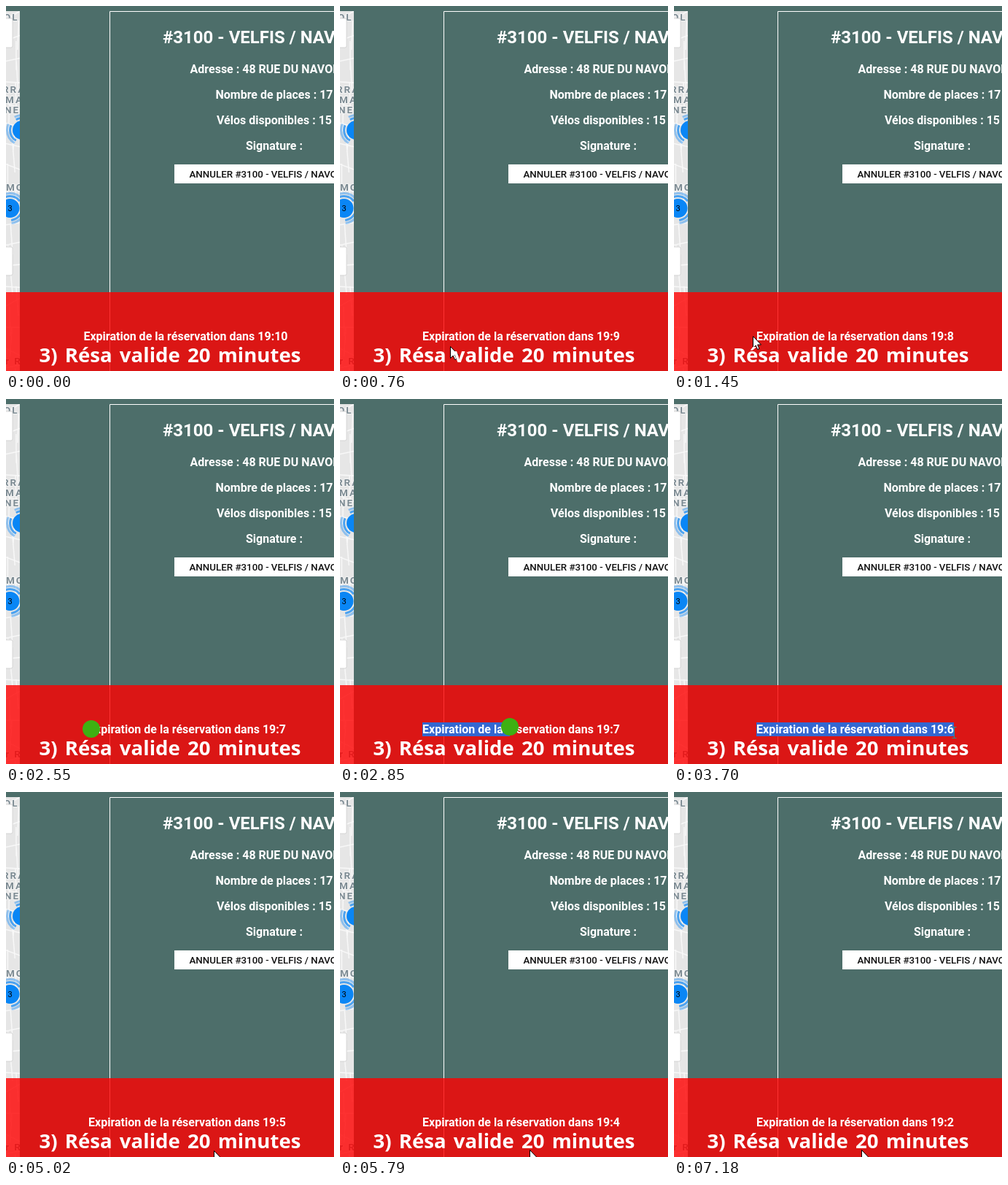
Write an HTML page that moves like this. It is 450 px wide and 500 px high and loops after 8 s.

```html
<!DOCTYPE html>
<html lang="fr">
<head>
<meta charset="utf-8">
<title>Réservation</title>
<style>
html, body { margin: 0; width: 100%; height: 100%; overflow: hidden; background: #4d6e6a; }
svg { display: block; width: 450px; height: 500px; }
text { font-family: Roboto, sans-serif; white-space: pre; }
.info { font-size: 16px; font-weight: 700; fill: #fff; }
.title { font-size: 24px; font-weight: 700; fill: #fff; }
.button { font-size: 13.333px; font-weight: 500; fill: #111; }
.caption { font: 700 27.6px "Open Sans", "Noto Sans", sans-serif; word-spacing: 3px; fill: #fff; }
.place { font-size: 13.5px; font-weight: 700; letter-spacing: 2px; fill: #7d8b93; stroke: #f4f4f4; stroke-width: 2px; paint-order: stroke; }
.middle { text-anchor: middle; }
.ring { fill: none; stroke: #0a86f5; stroke-width: 3; }
.panel { fill: #fff; stroke: #d4d4d4; }
</style>
</head>
<body>
<svg viewBox="0 0 450 500">
  <defs>
    <clipPath id="strip"><rect y="7" width="19" height="493"/></clipPath>
    <g id="cluster">
      <circle class="ring" r="20.500" pathLength="3" stroke-dasharray=".7 .3" stroke-opacity=".4"/>
      <circle class="ring" r="16.500" pathLength="3" stroke-dasharray=".7 .3" stroke-opacity=".7"/>
      <circle r="13" fill="#0a86f5"/>
    </g>
  </defs>

  <rect width="450" height="500" fill="#4d6e6a"/>

  <g clip-path="url(#strip)">
    <rect width="19" height="500" fill="#e6e6e6"/>
    <path id="roads" fill="none" stroke="#f8f8f8" stroke-width="1.500"/>
    <text class="place" x="-3" y="20">OL</text>
    <rect class="panel" x="-5" y="17" width="14" height="40" rx="2"/>
    <rect class="panel" x="-5" y="330" width="14" height="39" rx="2"/>
    <text class="place" x="-5" y="119">RRA</text>
    <text class="place" x="-1" y="133">MA</text>
    <text class="place" x="-2" y="147">NE</text>
    <text class="place" x="0" y="253">MO</text>
    <text class="place" x="-1" y="491">r R</text>
    <use href="#cluster" x="22" y="170"/>
    <use href="#cluster" x="5.500" y="277"/>
    <text class="middle" x="5.500" y="281" font-size="11">3</text>
  </g>

  <path d="M450 7.500H142.500V500" fill="none" stroke="#fff"/>
  <text class="title" x="215" y="51">#3100 - VELFIS / NAVORINE</text>
  <text class="info" x="252.500" y="92">Adresse : 48 RUE DU NAVORINE</text>
  <text class="info middle" x="368" y="127">Nombre de places : 17</text>
  <text class="info middle" x="368" y="162">Vélos disponibles : 15</text>
  <text class="info middle" x="368" y="197">Signature :</text>
  <rect x="231" y="217" width="274" height="26" fill="#fff"/>
  <text class="button" x="251.500" y="235">ANNULER #3100 - VELFIS / NAVORINE</text>

  <rect y="392" width="450" height="108" fill="#f00" fill-opacity=".8"/>
  <rect id="selection" x="113" y="443" width="0" height="19" fill="#3367d1"/>
  <text id="expiry" class="info" y="458"></text>

  <path id="arrow" d="M.5 .5V16.500L4.200 13L6.700 18.500L9 17.500L6.600 12H11.500Z" fill="#fff" stroke="#000"/>
  <path id="beam" d="M-3 -7.500H3M0 -7.500V7.500M-3 7.500H3" fill="none" stroke="#2a8f96"/>
  <circle id="press" r="12" fill="#3eb012"/>

  <text class="caption middle" x="225" y="488">3) Résa valide 20 minutes</text>
</svg>
<script>
const LOOP = 8000, STEP = 77;
const PRESS = 2550, RELEASE = 3620, CLEAR = 3850;
const TEXT_LEFT = 113, TEXT_RIGHT = 384;

// Moments when the countdown loses a second
const ticks = [300, 1217, 2230, 3243, 4270, 5560, 6720, 7180];

const moves = [
  { at: 300, steps: 10, from: [215, 479], to: [108, 458] },
  { at: 1140, steps: 9, from: [96, 456], to: [123, 447] },
  { at: PRESS, steps: 4, from: [117, 452], to: [233, 449] },
  { at: 2858, steps: 6, from: [233, 449], to: [382, 452] },
  { at: 3697, steps: 2, from: [384, 456], to: [372, 510] },
  { at: 4710, steps: 10, from: [297, 493], to: [268, 489] },
  { at: 5560, steps: 4, from: [268, 489], to: [257, 490] }
];

const el = id => document.getElementById(id);
const arrow = el("arrow"), beam = el("beam"), press = el("press");
const selection = el("selection"), expiry = el("expiry");

function drawRoads() {
  let seed = 7, d = "";
  const random = () => (seed = seed * 16807 % 2147483647) / 2147483647;
  for (let y = 20; y < 500; y += 28) {
    d += `M-2 ${y}L22 ${y + 30 * random() - 15}`;
    d += `M${19 * random()} ${y}l${8 * random() - 4} 40`;
  }
  el("roads").setAttribute("d", d);
}

function pointer(t) {
  const move = moves.findLast(m => m.at <= t);
  if (!move) return null;
  const step = Math.floor((t - move.at + 8) / STEP);
  const k = Math.min(1, step / move.steps);
  return move.from.map((v, i) => Math.round(v + (move.to[i] - v) * k));
}

function place(node, [x, y], visible) {
  node.setAttribute("transform", `translate(${x} ${y})`);
  node.style.display = visible ? "" : "none";
}

function draw(t) {
  const left = 10 - ticks.filter(v => v <= t).length;
  expiry.textContent = "Expiration de la réservation dans 19:" + left;
  expiry.setAttribute("x", left > 9 ? 106.4 : TEXT_LEFT);

  const point = pointer(t), [x, y] = point || [0, 0];
  const pressed = t >= PRESS && t < RELEASE;
  const overText = x >= TEXT_LEFT && x <= TEXT_RIGHT && y > 443 && y < 462;
  place(press, [x, y], pressed);
  place(beam, [x + 0.5, y + 1], !pressed && overText);
  place(arrow, [x, y], point && !pressed && !overText);

  const end = t < RELEASE ? x : TEXT_RIGHT;
  const selecting = t > PRESS + STEP && t < CLEAR;
  selection.setAttribute("width", selecting ? end - TEXT_LEFT : 0);
}

function frame() {
  draw(performance.now() % LOOP);
  requestAnimationFrame(frame);
}
drawRoads();
frame();
</script>
</body>
</html>
```
